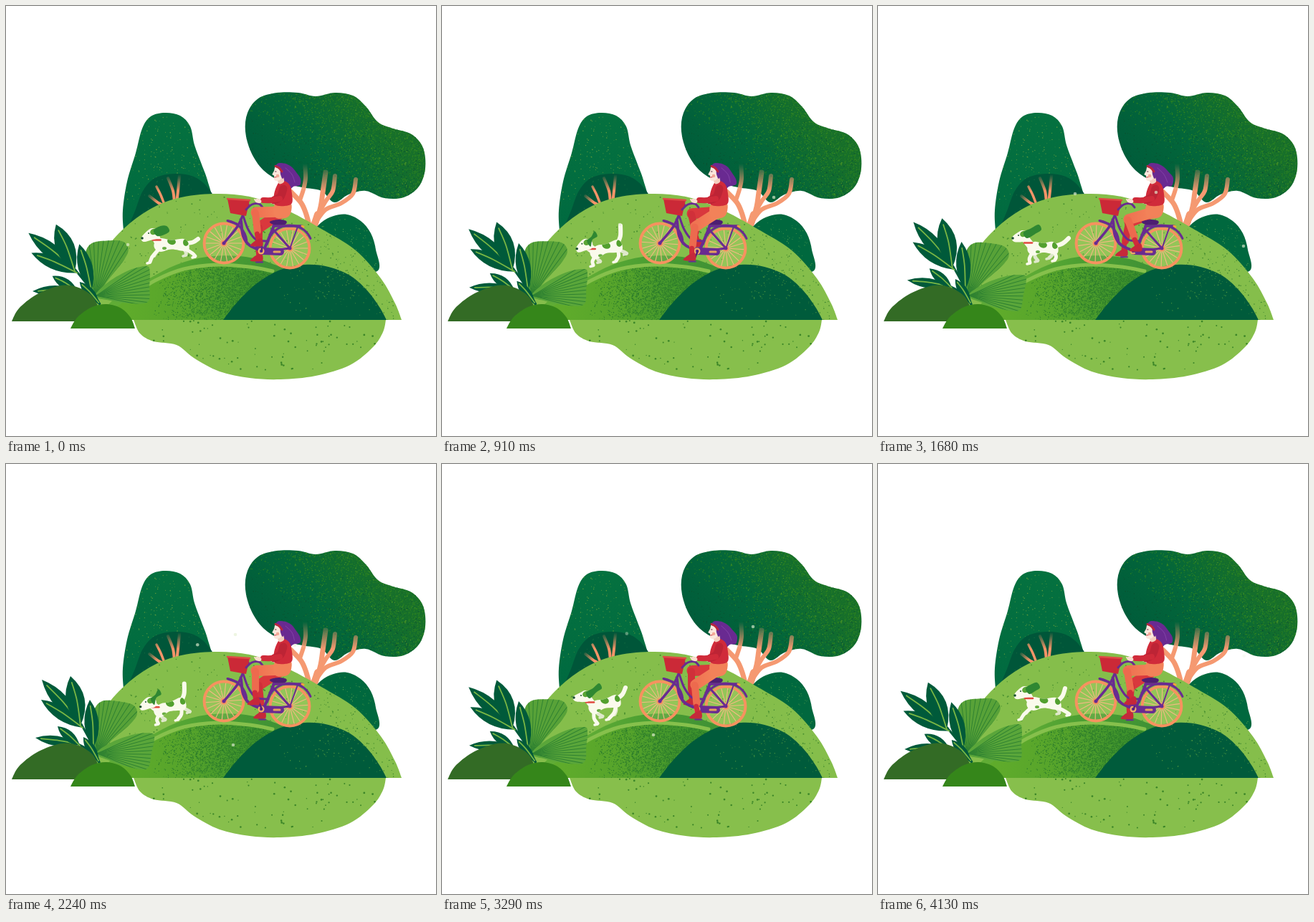
Recreate the animation shown at these times as an HTML page with a canvas. Size 600x600 px, loop 4200 ms.

```html
<!DOCTYPE html>
<html lang="en">
<head>
<meta charset="utf-8">
<title>Bike ride</title>
<style>
html, body { margin: 0; width: 100%; height: 100%; overflow: hidden; background: #fff; }
canvas { display: block; width: 600px; height: 600px; }
</style>
</head>
<body>
<canvas id="stage" width="600" height="600"></canvas>
<script>
const LOOP = 4200, STEP = 70, TAU = Math.PI * 2;
const view = document.getElementById('stage').getContext('2d');
const scene = document.createElement('canvas');
scene.width = scene.height = 600;
let g = scene.getContext('2d');

let seed = 11;
function rand() {
  seed = (seed * 1664525 + 1013904223) % 4294967296;
  return seed / 4294967296;
}
const clamp = (v, a = 0, b = 1) => Math.max(a, Math.min(b, v));
const mix = (a, b, k) => a + (b - a) * k;

// Smooth path through a flat list of points; open ones close with a straight edge.
function smooth(p, closed) {
  const n = p.length / 2, path = new Path2D();
  const at = i => {
    i = closed ? (i + n) % n : clamp(i, 0, n - 1);
    return [p[2 * i], p[2 * i + 1]];
  };
  path.moveTo(p[0], p[1]);
  for (let i = 0; i < (closed ? n : n - 1); i++) {
    const a = at(i - 1), b = at(i), c = at(i + 1), d = at(i + 2);
    path.bezierCurveTo(b[0] + (c[0] - a[0]) / 6, b[1] + (c[1] - a[1]) / 6,
      c[0] - (d[0] - b[0]) / 6, c[1] - (d[1] - b[1]) / 6, c[0], c[1]);
  }
  return path;
}
function fill(color, p, closed) {
  const path = smooth(p, closed);
  g.fillStyle = color;
  g.fill(path);
  return path;
}
function line(color, width, p) {
  g.strokeStyle = color;
  g.lineWidth = width;
  g.lineCap = g.lineJoin = 'round';
  g.stroke(smooth(p));
}
function limb(color, width, p) {
  g.strokeStyle = color;
  g.lineWidth = width;
  g.lineCap = g.lineJoin = 'round';
  g.beginPath();
  for (let i = 0; i < p.length; i += 2) g.lineTo(p[i], p[i + 1]);
  g.stroke();
}
function oval(color, x, y, rx, ry = rx, turn = 0) {
  g.fillStyle = color;
  g.beginPath();
  g.ellipse(x, y, rx, ry, turn, 0, TAU);
  g.fill();
}
function ramp(x0, y0, x1, y1, ...colors) {
  const r = g.createLinearGradient(x0, y0, x1, y1);
  colors.forEach((c, i) => r.addColorStop(i / (colors.length - 1), c));
  return r;
}
function speckle(path, [x, y, w, h], n, color, size, density = () => 1) {
  g.save();
  g.clip(path);
  g.fillStyle = color;
  for (let i = 0; i < n; i++) {
    const px = x + rand() * w, py = y + rand() * h, r = size * (0.5 + rand() * 0.6);
    if (rand() > density(px, py)) continue;
    g.beginPath();
    g.arc(px, py, r, 0, TAU);
    g.fill();
  }
  g.restore();
}

function paintScene() {
  // back tree and its bush
  let s = fill(ramp(0, 150, 0, 310, '#05713f', '#006a40'),
    [164, 314, 163, 285, 169, 245, 181, 205, 190, 171, 202, 154, 222, 149, 243, 153, 257, 168, 263, 194, 273, 221, 281, 243, 287, 275, 270, 312]);
  speckle(s, [160, 148, 130, 160], 420, '#5d9a3c', 0.75, (x, y) => 1 - Math.abs(y - 210) / 110);
  s = fill('#005639', [168, 314, 180, 286, 191, 258, 208, 240, 235, 234, 262, 238, 282, 254, 290, 275, 270, 312]);
  speckle(s, [170, 234, 120, 60], 60, '#1f7445', 0.6);
  const twig = ramp(0, 235, 0, 258, 'rgba(246,148,104,0)', '#f69468');
  line(twig, 4, [238, 275, 240, 258, 242, 236]);
  line(twig, 4, [235, 275, 233, 258, 226, 240]);
  line(ramp(197, 262, 212, 272, 'rgba(246,148,104,0)', '#f69468'), 4, [224, 280, 213, 275, 200, 265]);
  line(twig, 3.5, [221, 277, 216, 264, 210, 252]);

  // canopy, trunk, far bush
  s = fill(ramp(360, 240, 500, 130, '#005c3b', '#03663a', '#176f2a'),
    [334, 175, 337, 149, 352, 129, 378, 121, 408, 121, 432, 126, 459, 121, 484, 125, 502, 140, 519, 162, 540, 171, 566, 179, 582, 198, 585, 227, 576, 252, 555, 267, 528, 268, 502, 258, 478, 263, 458, 274, 440, 258, 413, 253, 384, 245, 359, 229, 342, 204], true);
  speckle(s, [334, 120, 252, 150], 7000, '#2f851f', 0.75,
    (x, y) => clamp((x - 350) / 210 - (y - 150) / 190 + 0.12));
  speckle(s, [334, 120, 252, 150], 2600, '#0b4f2f', 0.7, (x, y) => clamp((y - 150) / 140));
  speckle(s, [334, 120, 252, 150], 900, '#5a9c27', 0.65, (x, y) => clamp((x - 410) / 180 - (y - 180) / 200));
  const bark = ramp(0, 220, 0, 258, 'rgba(245,153,113,0)', '#f59971');
  line('#f59971', 10, [426, 315, 431, 303, 435, 291]);
  line(bark, 7, [432, 305, 439, 280, 442, 260, 446, 232]);
  line(bark, 6, [438, 286, 447, 271, 456, 258, 459, 237]);
  line(bark, 6, [432, 302, 446, 284, 468, 275, 484, 262, 488, 242]);
  line('#f59971', 7, [424, 310, 419, 291, 412, 275, 397, 259]);
  line(bark, 6, [410, 271, 415, 256, 418, 240, 417, 218]);
  s = fill('#00683e', [425, 318, 440, 302, 457, 293, 476, 291, 495, 300, 509, 317, 516, 340, 518, 370, 470, 370]);
  speckle(s, [430, 290, 90, 80], 170, '#4c9a4a', 0.65);

  // hill and lower ground
  s = fill('#85be4b', [122, 438, 122, 385, 137, 343, 165, 310, 200, 284, 240, 268, 290, 262, 340, 266, 388, 283, 440, 311, 488, 341, 523, 380, 543, 415, 552, 438]);
  speckle(s, [130, 262, 420, 176], 420, '#4b9130', 1);
  speckle(s, [430, 310, 120, 128], 160, '#3d8530', 0.8);
  s = fill('#87bf4c', [178, 438, 187, 457, 206, 468, 238, 473, 262, 491, 298, 510, 340, 519, 383, 521, 432, 516, 480, 501, 512, 476, 526, 455, 530, 438]);
  speckle(s, [200, 438, 330, 70], 90, '#3c8628', 1.3);

  // path with its darker bank
  fill(ramp(200, 0, 380, 0, '#60ac35', '#4a9e32', '#409235'),
    [125, 438, 150, 410, 195, 383, 238, 361, 280, 350, 325, 349, 370, 359, 415, 385, 415, 438]);
  s = fill(ramp(170, 0, 350, 0, '#5fab2b', '#55a32b', '#3e932c'),
    [128, 438, 170, 409, 210, 384, 250, 368, 295, 363, 340, 366, 400, 380, 420, 438]);
  speckle(s, [190, 360, 220, 78], 9500, '#2b7b2b', 0.75,
    (x, y) => clamp((x - 205) / 120) * clamp(1.25 - Math.abs(y - 396) / 55));
  line('#86c04c', 5, [183, 400, 208, 383, 248, 367, 295, 361, 340, 364, 372, 370]);

  // front bush
  s = fill('#005b3b', [303, 438, 322, 414, 350, 387, 383, 368, 417, 361, 450, 364, 480, 376, 504, 397, 521, 420, 531, 438]);
  speckle(s, [360, 360, 170, 78], 520, '#4d963f', 0.7, (x, y) => clamp((x - 370) / 130) * clamp((440 - y) / 60));
}

// ---- plants ----
function leaf(bx, by, tx, ty, w) {
  const nx = -(ty - by), ny = tx - bx, d = Math.hypot(nx, ny);
  const ux = nx / d * w, uy = ny / d * w, mx = mix(bx, tx, 0.52), my = mix(by, ty, 0.52);
  g.fillStyle = '#005a3a';
  g.beginPath();
  g.moveTo(bx, by);
  g.quadraticCurveTo(mx + ux, my + uy, tx, ty);
  g.quadraticCurveTo(mx - ux, my - uy, bx, by);
  g.fill();
  line('#79b644', 1.8, [bx, by, mix(bx, tx, 0.5) + ux * 0.08, mix(by, ty, 0.5) + uy * 0.08, mix(bx, tx, 0.87), mix(by, ty, 0.87)]);
}
function rays(n, a0, a1, len) {
  for (let i = 0; i <= n; i++) {
    const a = mix(a0, a1, i / n), r = len - 5 * Math.abs(i / n - 0.5);
    limb('#2f8231', 1, [127, 404, 127 + Math.cos(a) * r, 404 + Math.sin(a) * r]);
  }
}
function fan(color, p, ...ray) {
  const path = fill(color, p, true);
  g.save();
  g.clip(path);
  rays(...ray);
  g.restore();
}
function plants(t) {
  const u = 1 - Math.abs(t / (LOOP / 2) - 1);
  const ease = u < 0.5 ? 4 * u ** 3 : 1 - 4 * (1 - u) ** 3;
  g.save();
  g.translate(128, 412);
  g.rotate(-0.18 * (1 - ease));
  g.translate(-128, -412);
  fan('#58a238', [124, 404, 121, 372, 123, 344, 134, 331, 155, 331, 177, 336, 183, 348, 175, 361, 150, 383], 11, -1.7, -0.72, 92);
  fan('#5aa63a', [126, 404, 148, 388, 180, 377, 204, 376, 207, 384, 203, 403, 197, 425, 172, 423, 145, 414], 11, -0.42, 0.38, 90);
  line('#00593a', 3, [130, 416, 121, 393, 105, 363]);
  line('#00593a', 3, [130, 416, 113, 398, 92, 387]);
  leaf(104, 362, 50, 301, 20);
  leaf(107, 368, 49, 329, 18);
  leaf(104, 365, 90, 296, 26);
  leaf(122, 396, 117, 329, 20);
  leaf(101, 391, 41, 382, 14);
  leaf(103, 393, 72, 366, 14);
  leaf(129, 414, 108, 381, 13);
  g.restore();
  fill('#336b25', [8, 440, 18, 422, 42, 403, 72, 391, 95, 391, 116, 401, 127, 416, 131, 440]);
  fill('#35861a', [90, 450, 100, 434, 120, 420, 141, 416, 161, 422, 174, 435, 180, 450]);
}

// ---- dog: step, then nose, skull, chest, hip, tail, two fore and two hind paws, ear ----
const gait = [
  [0, 189, 325, 207, 318, 214, 333, 248, 334, 268, 325, 200, 360, 206, 351, 263, 352, 250, 350, 226, 311],
  [4, 187, 325, 204, 321, 216, 338, 244, 338, 266, 324, 211, 361, 222, 358, 246, 357, 238, 354, 226, 309],
  [7, 183, 327, 202, 324, 212, 339, 242, 331, 256, 312, 216, 365, 223, 355, 232, 358, 240, 352, 221, 310],
  [12.5, 187, 341, 203, 334, 214, 344, 244, 335, 248, 306, 211, 365, 221, 360, 240, 359, 257, 348, 214, 319],
  [19, 190, 324, 207, 318, 215, 334, 248, 335, 261, 313, 199, 358, 206, 350, 266, 352, 252, 350, 224, 309]
];
function dog(t) {
  const k = t / STEP % 20;
  let i = gait.length - 1;
  while (gait[i][0] > k) i--;
  const a = gait[i], b = gait[(i + 1) % gait.length];
  const f = (k - a[0]) / ((b[0] || 20) - a[0]);
  const [, nx, ny, hx, hy, cx, cy, px, py, tx, ty, f1x, f1y, f2x, f2y, b1x, b1y, b2x, b2y, ex, ey] =
    a.map((v, j) => mix(v, b[j], f));
  const coat = '#fafaec', shade = '#dfe8cb';
  const leg = (c, x, y, qx, qy, bend) => {
    line(c, 5, [x, y + 4, mix(x, qx, 0.55) + bend, mix(y, qy, 0.6), qx + 1, qy - 3]);
    line(c, 3.5, [qx + 1, qy - 2, qx - 3, qy - 1]);
  };
  leg(shade, cx + 2, cy, f2x, f2y, -1);
  leg(shade, px, py, b2x, b2y, 2);
  line(coat, 6, [px, py - 2, mix(px, tx, 0.55) + 2, mix(py, ty, 0.5), tx, ty]);
  limb(coat, 11, [hx + 1, hy + 3, cx, cy]);
  const mx = (cx + px) / 2, my = (cy + py) / 2;
  const body = fill(coat, [cx - 7, cy - 2, cx + 2, cy - 9, mx, my - 7, px, py - 9, px + 7, py - 2, px + 5, py + 8, mx, my + 6, cx + 2, cy + 10, cx - 6, cy + 6], true);
  leg(coat, cx, cy + 1, f1x, f1y, -2);
  leg(coat, px + 1, py, b1x, b1y, 3);
  g.save();
  g.clip(body);
  oval('#53a02f', mx, my - 5, 6, 4.5, 0.3);
  oval('#53a02f', px + 3, py - 4, 4, 5);
  oval('#6aae43', cx + 7, cy + 5, 3, 2);
  g.restore();
  limb('#e0483f', 2.6, [mix(hx, cx, 0.5) - 6, mix(hy, cy, 0.5) + 1, mix(hx, cx, 0.5) + 5, mix(hy, cy, 0.5) + 1]);
  fill(coat, [nx, ny - 2, hx - 9, hy - 5, hx - 2, hy - 8, hx + 6, hy - 4, hx + 6, hy + 5, hx - 2, hy + 8, nx + 3, ny + 4], true);
  oval('#5aa536', hx - 1, hy - 3, 5, 4, -0.4);
  fill('#2f8732', [hx - 1, hy - 5, mix(hx, ex, 0.45), hy - 11, ex - 2, ey - 4, ex + 2, ey + 3, ex - 5, ey + 8, hx + 4, hy + 3], true);
  oval('#174f2b', nx + 1, ny - 1, 1.8);
  oval('#174f2b', hx - 8, hy - 1, 1);
}

// ---- bicycle and rider ----
const purple = '#692b91', red = '#d02b3a', coral = '#f6925f';
function wheel(x, y, t) {
  oval('rgba(214,224,142,.18)', x, y, 27);
  for (let i = 0; i < 18; i++) {
    const a = i / 18 * TAU - t / 2100 * TAU;
    limb('#f3b983', 1.1, [x, y, x + Math.cos(a) * 26, y + Math.sin(a) * 26]);
  }
  g.strokeStyle = coral;
  g.lineWidth = 4;
  g.beginPath();
  g.arc(x, y, 27.4, 0, TAU);
  g.stroke();
  oval(coral, x, y, 4.5);
  oval(purple, x, y, 2.5);
}
function arc(x, y, r, a0, a1, w) {
  g.strokeStyle = purple;
  g.lineWidth = w;
  g.lineCap = 'round';
  g.beginPath();
  g.arc(x, y, r, a0, a1);
  g.stroke();
}
function leg(turn, color, low) {
  const a = turn * TAU, hx = 386, hy = 287;
  const fx = 352 - 10.5 * Math.sin(a), fy = 340 - 10.5 * Math.cos(a);
  const dx = fx - hx, dy = fy - 4 - hy, d = Math.hypot(dx, dy);
  const bend = Math.sqrt(Math.max(0, 40 * 40 - d * d / 4));
  const kx = hx + dx / 2 - dy / d * bend, ky = hy + dy / 2 + dx / d * bend;
  limb(color, 15, [hx, hy, kx + 3, ky + 2]);
  limb(low, 10, [kx + 2, ky + 3, mix(kx, fx, 0.65) + 1, mix(ky, fy, 0.65)]);
  limb(red, 7, [mix(kx, fx, 0.74), mix(ky, fy, 0.74), fx + 1, fy]);
  fill('#c5283a', [fx + 5, fy - 5, fx + 6, fy + 5, fx - 4, fy + 6, fx - 11, fy + 5, fx - 8, fy + 1, fx - 2, fy - 3], true);
  limb(purple, 2, [fx - 3, fy + 7, fx + 6, fy + 7]);
}
function rider(t) {
  const turn = t / 2100, wave = Math.sin(t / 1400 * TAU);
  wheel(396, 338, t);
  wheel(304, 331, t);
  leg(turn + 0.5, '#d9383d', '#d0303a');

  // frame
  arc(396, 338, 32, Math.PI * 1.06, Math.PI * 1.86, 3);
  arc(304, 331, 32, Math.PI * 1.55, Math.PI * 1.96, 3);
  line(purple, 3.5, [338, 277, 331, 291, 322, 309, 304, 331]);
  line(purple, 4, [328, 300, 331, 321, 340, 334, 358, 342]);
  line(purple, 3, [331, 293, 338, 312, 349, 326, 366, 328]);
  limb(purple, 4, [375, 304, 366, 326, 359, 342]);
  limb(purple, 3, [372, 311, 396, 338, 359, 343]);
  limb(purple, 3.5, [373, 307, 413, 307]);
  limb(purple, 2, [407, 308, 397, 336]);
  limb('#f2a33c', 3, [413, 307, 415, 308]);
  limb(purple, 3, [310, 300, 322, 304]);
  limb(purple, 10, [357, 342, 383, 343]);
  oval('#f2ae64', 356, 342, 4.5);
  oval(purple, 356, 342, 2.2);
  limb('#e4a05d', 3, [374, 343, 382, 343]);
  const a = turn * TAU;
  limb('#55207a', 2.5, [357, 342, 357 - 10 * Math.sin(a), 342 - 10 * Math.cos(a)]);
  fill('#4d1e72', [368, 301, 380, 298, 391, 300, 389, 305, 374, 305], true);

  // basket and bars
  g.fillStyle = '#cb2937';
  g.beginPath();
  g.moveTo(309, 269);
  g.lineTo(340, 271);
  g.lineTo(335, 293);
  g.lineTo(313, 289);
  g.fill();
  limb('#df4a45', 2.5, [309, 269, 340, 271]);
  line(purple, 3, [335, 284, 343, 277, 353, 276, 358, 281]);

  leg(turn, ramp(345, 0, 392, 0, '#ee6f50', '#f58a5c'), '#ed6a4e');
  fill('#f28259', [375, 277, 396, 274, 398, 286, 392, 295, 376, 295], true);

  // hair, body, head
  fill('#692a91', [378, 221, 388, 219.5, 398, 224, 405 + wave, 232, 411 + wave, 241 - wave, 410, 250 + wave, 401 + wave, 252, 394, 258, 388, 250, 383, 236], true);
  line('#8243a8', 1, [390, 226, 399, 235, 403 + wave, 246]);
  fill(red, [380, 247, 388, 244, 396, 250, 399, 262, 399, 275, 389, 279, 375, 277, 374, 263], true);
  line('#bd2435', 11, [387, 255, 383, 266, 374, 271]);
  line(red, 8, [382, 269, 370, 271, 359, 271]);
  oval('#f9ddcf', 352, 272, 4.5, 3, 0.3);
  line('#f9ddcf', 2, [350, 273, 347, 270]);
  fill('#f4cfbf', [378, 237, 385, 235, 388, 245, 381, 248], true);
  fill('#fbe7dc', [376, 224, 383, 224, 386, 232, 384, 241, 378, 244, 374, 242, 374, 237, 371.5, 235, 374, 230], true);
  oval('#f3a996', 379, 237, 2.3);
  limb('#57263f', 1, [375.5, 231, 377, 231]);
  limb('#cc3545', 1.1, [374.5, 239, 377, 238.7]);
  fill('#692a91', [375, 224, 380, 220, 387, 221, 389, 234, 386, 241, 383, 235, 382, 228], true);
  line('#b9263c', 3, [376, 223.5, 381, 226, 385, 231]);
}

// ---- drifting motes: time, x, y ----
const motes = [
  [[0, 170, 333], [910, 248, 305], [1680, 275, 262], [2240, 320, 238], [2730, 373, 215], [3290, 434, 227], [3920, 498, 255], [4200, 515, 272]],
  [[250, 408, 240], [560, 436, 250], [910, 463, 267], [1120, 482, 283], [1680, 510, 335], [2240, 545, 424]],
  [[1980, 270, 256], [2730, 262, 245], [3400, 257, 235]],
  [[1400, 382, 263], [1680, 388, 260], [2240, 403, 253], [2380, 406, 251]],
  [[1800, 326, 398], [2240, 317, 392], [3290, 295, 378], [4000, 280, 366]]
];
function drift(t) {
  for (const m of motes) {
    const first = m[0][0], last = m[m.length - 1][0];
    if (t < first || t > last) continue;
    let i = 0;
    while (i < m.length - 2 && m[i + 1][0] <= t) i++;
    const [t0, x0, y0] = m[i], [t1, x1, y1] = m[i + 1], k = (t - t0) / (t1 - t0);
    g.globalAlpha = 0.65 * (first ? clamp((t - first) / 180) : 1) * clamp((last - t) / 180);
    oval('#e5f0d3', mix(x0, x1, k), mix(y0, y1, k), 2.3);
    g.globalAlpha = 1;
  }
}

paintScene();
g = view;
function frame() {
  const t = Math.floor(performance.now() % LOOP / STEP) * STEP;
  g.fillStyle = '#fff';
  g.fillRect(0, 0, 600, 600);
  g.drawImage(scene, 0, 0);
  plants(t);
  dog(t);
  rider(t);
  drift(t);
  requestAnimationFrame(frame);
}
frame();
</script>
</body>
</html>
```
